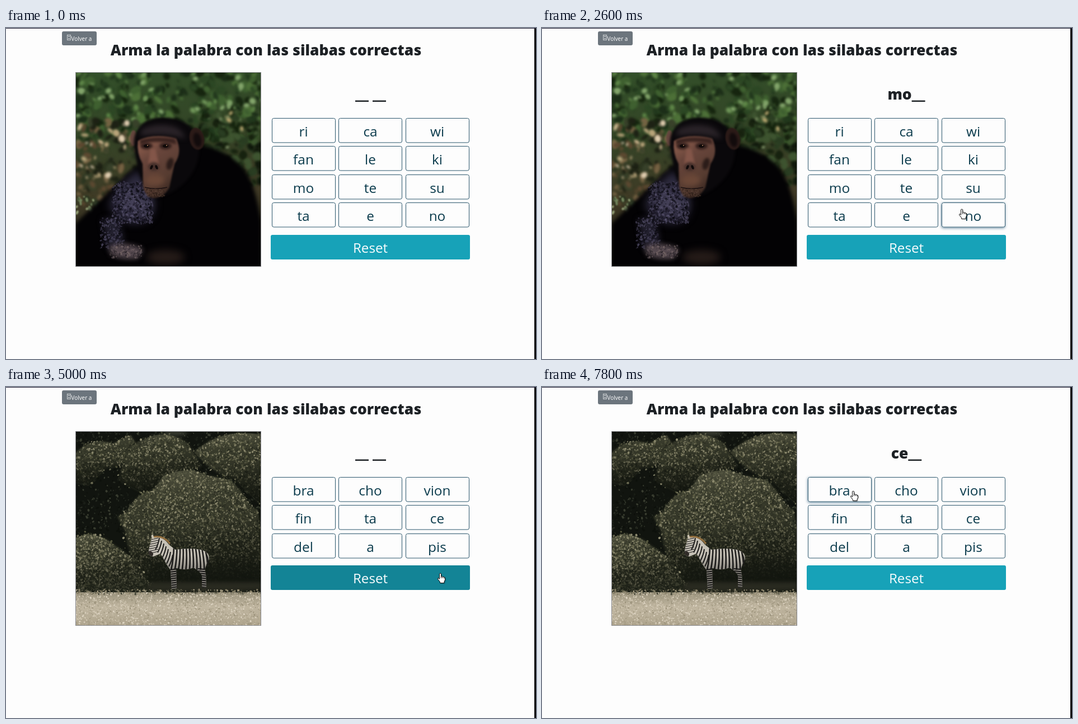
An HTML page with a canvas for the animation above (8 s loop, 947 px wide and 592 px high).

```html
<!DOCTYPE html>
<html lang="es">
<head>
<meta charset="utf-8">
<title>Arma la palabra</title>
<style>
html, body { margin: 0; width: 100%; height: 100%; overflow: hidden; background: #fdfdfd; }
canvas { display: block; }
</style>
</head>
<body>
<canvas id="stage" width="947" height="592"></canvas>
<script>
const ctx = document.getElementById('stage').getContext('2d');
const LOOP = 8000, STEP = 200;
const FONT = '"Open Sans", "Noto Sans", sans-serif';
const INK = '#1d2125';
const PIC = { x: 124, y: 79, w: 332, h: 348 };

function randomizer(seed) {
  return () => {
    seed = (seed * 1664525 + 1013904223) >>> 0;
    return seed / 4294967296;
  };
}

function photo(paint) {
  const c = document.createElement('canvas');
  c.width = PIC.w;
  c.height = PIC.h;
  const g = c.getContext('2d');
  g.translate(-PIC.x, -PIC.y);
  paint(g);
  return c;
}

function fill(g, shape, color, blur = 0) {
  g.filter = blur ? `blur(${blur}px)` : 'none';
  g.fillStyle = color;
  g.fill(shape instanceof Path2D ? shape : new Path2D(shape));
  g.filter = 'none';
}

function oval(x, y, rx, ry, turn = 0) {
  const p = new Path2D();
  p.ellipse(x, y, rx, ry, turn, 0, 7);
  return p;
}

function shade(g, x0, y0, x1, y1, ...colors) {
  const s = g.createLinearGradient(x0, y0, x1, y1);
  colors.forEach((c, i) => s.addColorStop(i / (colors.length - 1), c));
  return s;
}

// Scatters small slanted ovals over a box
function dabs(g, rnd, n, [x, y, w, h], size, colors, blur = 0) {
  g.filter = blur ? `blur(${blur}px)` : 'none';
  for (let i = 0; i < n; i++) {
    const r = size * (0.4 + rnd());
    g.fillStyle = colors[Math.floor(rnd() * colors.length)];
    g.fill(oval(x + rnd() * w, y + rnd() * h, r, r * (0.4 + rnd() * 0.5), rnd() * 3));
  }
  g.filter = 'none';
}

function inside(g, path, paint) {
  g.save();
  g.clip(path);
  paint();
  g.restore();
}

const monkey = photo(g => {
  const rnd = randomizer(11);
  g.fillStyle = shade(g, 124, 79, 150, 427, '#33502a', '#334426', '#403a26', '#12140d');
  g.fillRect(PIC.x, PIC.y, PIC.w, PIC.h);
  dabs(g, rnd, 300, [124, 75, 332, 130], 8, ['#22381d', '#4d7038', '#16250f', '#3f6030', '#2c4724', '#1c2e18'], 2);
  dabs(g, rnd, 60, [124, 80, 332, 85], 4.5, ['#6f9558', '#84a66c', '#5f8748'], 2);
  dabs(g, rnd, 150, [124, 165, 110, 150], 7, ['#5c4830', '#2c3520', '#766344', '#1d2114', '#38412a'], 2);
  dabs(g, rnd, 26, [125, 170, 95, 100], 5, ['#d3bb94', '#b8a47a', '#e0cdb0'], 2);
  dabs(g, rnd, 150, [345, 150, 111, 130], 7, ['#17220f', '#2a3d22', '#3e5430', '#10180c'], 2);
  dabs(g, rnd, 8, [375, 145, 70, 70], 4, ['#b8a670', '#86996c'], 2);
  dabs(g, rnd, 18, [126, 300, 40, 30], 3.5, ['#75875f', '#46593a', '#98a57a'], 1);

  const body = new Path2D('M124 350C155 320 175 300 198 278Q222 252 240 243L340 210C370 207 410 232 425 252C445 278 450 320 456 345V427H124Z');
  fill(g, body, '#030204', 3);
  inside(g, body, () => {
    fill(g, 'M236 254C212 272 196 290 184 318L205 342Q245 360 262 330C268 310 262 290 250 276Z', '#2f2c40', 8);
    fill(g, 'M216 290Q244 296 258 318Q240 336 204 314Z', '#454158', 8);
    fill(g, 'M172 342L196 340Q212 365 208 392L184 396Z', '#23212f', 6);
    const hair = ['#5d597588', '#1a182499', '#3d3a50aa', '#09080d99'];
    dabs(g, rnd, 700, [190, 275, 72, 75], 2.2, hair, 0.6);
    dabs(g, rnd, 300, [168, 340, 42, 54], 2, hair, 0.6);
    fill(g, 'M184 390Q212 380 245 395L236 412Q205 416 186 404Z', '#54484e', 4);
    dabs(g, rnd, 120, [186, 388, 56, 24], 1.8, ['#81716f88', '#2a242a99', '#5e525799'], 0.6);
    fill(g, oval(285, 410, 34, 13), '#251b18', 7);
  });

  fill(g, oval(228, 197, 6, 14), '#65463e', 1);
  fill(g, 'M229 215C225 180 247 160 282 160C323 160 349 185 345 222C342 263 310 294 267 305C241 290 235 250 229 215Z', '#0a080b', 2);
  fill(g, 'M242 182Q267 168 300 176Q318 184 320 198Q283 186 240 193Z', '#2a2328', 5);
  fill(g, oval(341, 198, 13, 20, -0.2), '#2c1b18', 1);
  fill(g, oval(342, 200, 7, 13, -0.2), '#120b0c', 2);
  fill(g, 'M236 202Q264 188 304 198Q316 222 301 243L292 285Q282 304 262 304Q245 298 245 278L244 243Q233 224 236 202Z',
    shade(g, 236, 195, 304, 302, '#9a6653', '#68453b', '#573c31', '#2c1e19'), 1.5);
  fill(g, 'M239 200Q267 191 302 198L305 208Q268 199 239 209Z', '#39231f', 2);
  for (const x of [251, 285]) {
    fill(g, oval(x, 211, 11, 6), '#2f1d1a', 2);
    fill(g, oval(x, 211, 5, 3), '#100a09');
    fill(g, oval(x + 2, 210, 1, 1), '#b98662');
  }
  fill(g, 'M258 216L267 216L273 243Q264 252 254 243Z', '#835649', 2);
  fill(g, oval(264, 248, 10, 8), '#452f2a', 2);
  fill(g, oval(260, 249, 2.2, 4, 0.4), '#100a0a');
  fill(g, oval(269, 249, 2.2, 4, -0.4), '#100a0a');
  fill(g, oval(293, 243, 6, 11, 0.3), '#2b1c19', 2);
  fill(g, oval(266, 272, 17, 10), '#6b4838', 4);
  g.lineWidth = 1.5;
  g.strokeStyle = '#1d1212';
  g.stroke(new Path2D('M248 285Q267 290 288 285'));
  dabs(g, rnd, 160, [250, 288, 34, 14], 1.2, ['#2b1e1988', '#5a443888']);
});

const zebra = photo(g => {
  const rnd = randomizer(29);
  const leaves = ['#6c6b53', '#3c3f2e', '#8e8b70', '#1d2017', '#53543c', '#2a2d21'];
  // Leaves spill a little over the edge, lit from above
  const bush = (shape, n, [x, y, w, h], bottom) => {
    const path = new Path2D(shape);
    fill(g, path, '#2c2f22', 2);
    for (let i = 0; i < n; i++) {
      const px = x + rnd() * w, py = y + rnd() * h;
      if (!g.isPointInPath(path, px - PIC.x, py - PIC.y)) continue;
      const reach = rnd() * 7;
      dabs(g, rnd, 1, [px - reach, py - reach, reach * 2, reach * 2], 1.7, leaves);
    }
    inside(g, path, () => {
      g.fillStyle = shade(g, x, y, x + w * 0.1, y + h, '#aaa68555', '#77755a22', '#10120c55', bottom);
      g.fillRect(x, y, w, h);
    });
  };
  g.fillStyle = '#11140f';
  g.fillRect(PIC.x, PIC.y, PIC.w, PIC.h);
  dabs(g, rnd, 1600, [124, 79, 332, 180], 1.9, ['#272b22', '#0d100b', '#383c2f', '#191d16']);
  fill(g, oval(302, 82, 22, 5), '#6f715f80', 4);
  bush('M124 118Q154 88 190 101L223 86L240 113Q210 147 180 143L147 175L124 170Z', 1500, [124, 80, 120, 100], '#10130ddd');
  bush('M204 168Q205 120 238 98Q286 70 326 102L349 142L300 153L248 191Z', 2200, [200, 79, 150, 110], '#10130ddd');
  bush('M336 117Q380 73 456 85V210L407 163Q372 157 336 117Z', 1800, [335, 79, 121, 130], '#10130dcc');
  bush('M199 232L215 224Q232 190 263 185L281 159Q328 140 355 157L400 166Q422 185 434 209L450 221L456 260V369H260Q220 310 213 258Z',
    8500, [198, 147, 258, 222], '#11140eee');
  fill(g, 'M250 318Q306 298 456 326V370H250Z', '#13160f99', 12);
  bush('M124 270L146 263Q176 266 193 282L221 302L242 330L264 365H124Z', 3200, [124, 262, 140, 105], '#191c1499');
  g.fillStyle = shade(g, 0, 360, 0, 427, '#8f8872', '#c0b6a0', '#aea48d');
  g.fillRect(124, 367, 332, 60);
  fill(g, 'M255 349H456V363Q350 369 255 365Z', '#292a20', 3);
  dabs(g, rnd, 2200, [124, 368, 332, 59], 1.3, ['#d0c6b2', '#9d947d', '#c3b9a4', '#ada38c', '#ddd4c2']);
  dabs(g, rnd, 300, [124, 362, 332, 9], 1.5, ['#807961', '#a59c82', '#48493a']);

  const body = new Path2D('M261 269C270 264 284 271 291 282L303 291C320 288 346 288 356 294C364 299 365 309 359 315C357 321 354 326 357 334L358 358L350 359L350 337C347 330 341 327 335 323C323 328 312 326 304 324L305 360L296 361L294 328C287 318 282 308 276 298L264 303C256 304 253 298 256 287Z');
  fill(g, body, '#c6c1b6');
  inside(g, body, () => {
    const line = (x0, y0, x1, y1) => {
      g.beginPath();
      g.moveTo(x0, y0);
      g.quadraticCurveTo((x0 + x1) / 2 + 2, (y0 + y1) / 2, x1, y1);
      g.stroke();
    };
    g.strokeStyle = '#1f1e1d';
    g.lineWidth = 2.6;
    for (let x = 300; x < 385; x += 5.5) line(x, 286, x + (x - 325) * 0.2, 327);
    g.lineWidth = 2;
    for (let i = 0; i < 7; i++) line(274 + i * 4, 270 + i * 5, 267 + i * 4, 291 + i * 5);
    for (let y = 325; y < 360; y += 4) {
      line(292, y + 2, 308, y);
      line(343, y, 362, y + 2);
    }
    g.lineWidth = 1.2;
    for (let y = 270; y < 296; y += 4) line(253, y + 4, 272, y);
    fill(g, oval(258, 299, 5, 5), '#302b27');
    g.fillStyle = shade(g, 0, 300, 0, 330, '#0000', '#0005');
    g.fillRect(250, 300, 120, 62);
  });
  g.strokeStyle = '#1f1e1d';
  g.lineWidth = 1.5;
  g.stroke(new Path2D('M358 298Q364 309 359 322'));
  g.strokeStyle = '#94703f';
  g.lineWidth = 3;
  g.stroke(new Path2D('M264 268Q281 265 293 280'));
  fill(g, oval(262, 268, 2, 4, -0.3), '#c9c1af');
});

const rounds = [
  { picture: monkey, resetY: 370, words: 'ri ca wi fan le ki mo te su ta e no'.split(' ') },
  { picture: zebra, resetY: 319, words: 'bra cho vion fin ta ce del a pis'.split(' ') }
];
const BUTTON = { w: 113, h: 44 };
const spot = i => [475 + (i % 3) * 119.5, 161.5 + Math.floor(i / 3) * 50.3];

// Pointer stops: time, x, y
const route = [
  [0, 600, 470], [600, 590, 440], [1200, 541, 288], [2000, 541, 288], [2800, 786, 330],
  [4000, 786, 330], [4400, 782, 331], [5000, 776, 333], [5200, 776, 333], [5800, 661, 245],
  [6200, 661, 245], [6800, 774, 238], [7200, 774, 238], [7800, 556, 186], [LOOP, 556, 186]
];
const swing = p => 0.5 - Math.cos(Math.PI * Math.min(1, Math.max(0, p))) / 2;

function pointerAt(t) {
  const i = route.findIndex(r => r[0] > t);
  const [t0, x0, y0] = route[i - 1], [t1, x1, y1] = route[i];
  const p = swing((t - t0) / (t1 - t0));
  return [x0 + (x1 - x0) * p, y0 + (y1 - y0) * p];
}

const within = ([px, py], x, y, w, h) => px >= x && px <= x + w && py >= y && py <= y + h;

function text(s, x, y, size, color = INK, weight = 400, align = 'center') {
  ctx.font = `${weight} ${size}px ${FONT}`;
  ctx.textAlign = align;
  ctx.fillStyle = color;
  ctx.fillText(s, x, y);
}
const HEAVY = 26.4;
const heavy = (s, x, y, align) => text(s, x, y, HEAVY, INK, 800, align);

function box(x, y, w, h, r, color) {
  ctx.beginPath();
  ctx.roundRect(x, y, w, h, r);
  ctx.fillStyle = color;
  ctx.fill();
}

function blank(x) {
  ctx.fillStyle = INK;
  ctx.fillRect(x, 129.5, 24, 2.5);
}

function drawWord(start) {
  if (!start) {
    blank(624);
    blank(655);
    return;
  }
  ctx.font = `800 ${HEAVY}px ${FONT}`;
  const w = ctx.measureText(start).width;
  const x = 651 - (w + 24) / 2;
  heavy(start, x, 128, 'left');
  blank(x + w);
}

function drawPicture(picture) {
  ctx.drawImage(picture, PIC.x, PIC.y);
  ctx.strokeStyle = '#85868a';
  ctx.lineWidth = 1;
  ctx.strokeRect(124.5, 79.5, 331, 347);
}

// Returns true when the pointer is over a button
function drawRound({ picture, resetY, words }, start, pointer) {
  let over = false;
  drawPicture(picture);
  drawWord(start);
  words.forEach((word, i) => {
    const [x, y] = spot(i), { w, h } = BUTTON;
    const hot = within(pointer, x, y, w, h);
    over = over || hot;
    ctx.save();
    if (hot) {
      ctx.shadowColor = 'rgba(20, 75, 110, .75)';
      ctx.shadowBlur = 5;
      ctx.shadowOffsetY = 1;
    }
    box(x, y, w, h, 3, '#fdfdfd');
    ctx.restore();
    ctx.strokeStyle = '#2b566c';
    ctx.lineWidth = 1;
    ctx.beginPath();
    ctx.roundRect(Math.floor(x) + 0.5, Math.floor(y) + 0.5, w, h - 0.5, 3);
    ctx.stroke();
    text(word, x + w / 2, Math.round(y + 32.5), 24.4, '#0b3b4c');
  });
  const hot = within(pointer, 473, resetY, 356, 44);
  box(473, resetY, 356, 44, 3, hot ? '#138496' : '#17a2b8');
  text('Reset', 651, resetY + 32, 24.2, '#f7fcfd');
  return over || hot;
}

function drawPraise() {
  drawPicture(monkey);
  ctx.strokeRect(472.5, 79.5, 337, 79);
  heavy('mono', 641, 128);
  heavy('Muy bien!', 651, 223);
}

const ARROW = new Path2D('M0 0V12.5L3 9.7L5 14.2L7 13.3L5 9H9Z');
const HAND = new Path2D('M-1.5 1Q0 -.8 1.5 1V6L3 5.6L4.3 6.6L6 6.2L7 7.4Q8.6 7 8.6 9V12L7 15V17.5H-.5V15.5L-4.5 10.5Q-4.8 8 -2.8 9L-1.5 10.5Z');

function drawPointer([x, y], hand) {
  const shape = hand ? HAND : ARROW;
  ctx.save();
  ctx.translate(x, y);
  ctx.lineJoin = 'round';
  ctx.shadowColor = 'rgba(0, 0, 0, .35)';
  ctx.shadowBlur = 2;
  ctx.shadowOffsetX = ctx.shadowOffsetY = 1;
  ctx.fillStyle = '#fff';
  ctx.fill(shape);
  ctx.shadowColor = 'transparent';
  ctx.strokeStyle = '#111';
  ctx.lineWidth = 1;
  ctx.stroke(shape);
  if (hand) ctx.stroke(new Path2D('M1.5 6V9M4.3 6.6V9M7 7.4V9.5'));
  ctx.restore();
}

function drawPage() {
  ctx.fillStyle = '#fdfdfd';
  ctx.fillRect(0, 0, 947, 592);
  ctx.fillStyle = '#1b1830';
  ctx.fillRect(0, 0, 947, 1);
  ctx.fillStyle = '#08080c';
  ctx.fillRect(944, 1, 3, 591);
  box(100, 6, 62, 25, 3, '#6c757d');
  ctx.strokeStyle = '#e4e6e8';
  ctx.lineWidth = 0.8;
  ctx.strokeRect(109.5, 12.5, 6, 9);
  ctx.fillStyle = '#e4e6e8';
  for (const y of [14, 18]) {
    ctx.fillRect(111, y, 1, 2);
    ctx.fillRect(113, y, 1, 2);
  }
  text('Volver a', 116.5, 22.5, 9.9, '#fff', 400, 'left');
  heavy('Arma la palabra con las silabas correctas', 464.5, 48.5);
}

function draw(t) {
  const pointer = pointerAt(t);
  let over = false;
  drawPage();
  if (t < 3000) {
    over = drawRound(rounds[0], t < 1800 ? '' : 'mo', pointer);
  } else if (t < 4200) {
    drawPraise();
  } else {
    ctx.globalAlpha = swing((t - 4265) / 600);
    over = drawRound(rounds[1], t < 7000 ? '' : 'ce', pointer);
    ctx.globalAlpha = 1;
  }
  if (t > 1400) drawPointer(pointer, over);
}

function tick(now) {
  draw(Math.floor((now % LOOP) / STEP) * STEP);
  requestAnimationFrame(tick);
}
requestAnimationFrame(tick);
</script>
</body>
</html>
```
